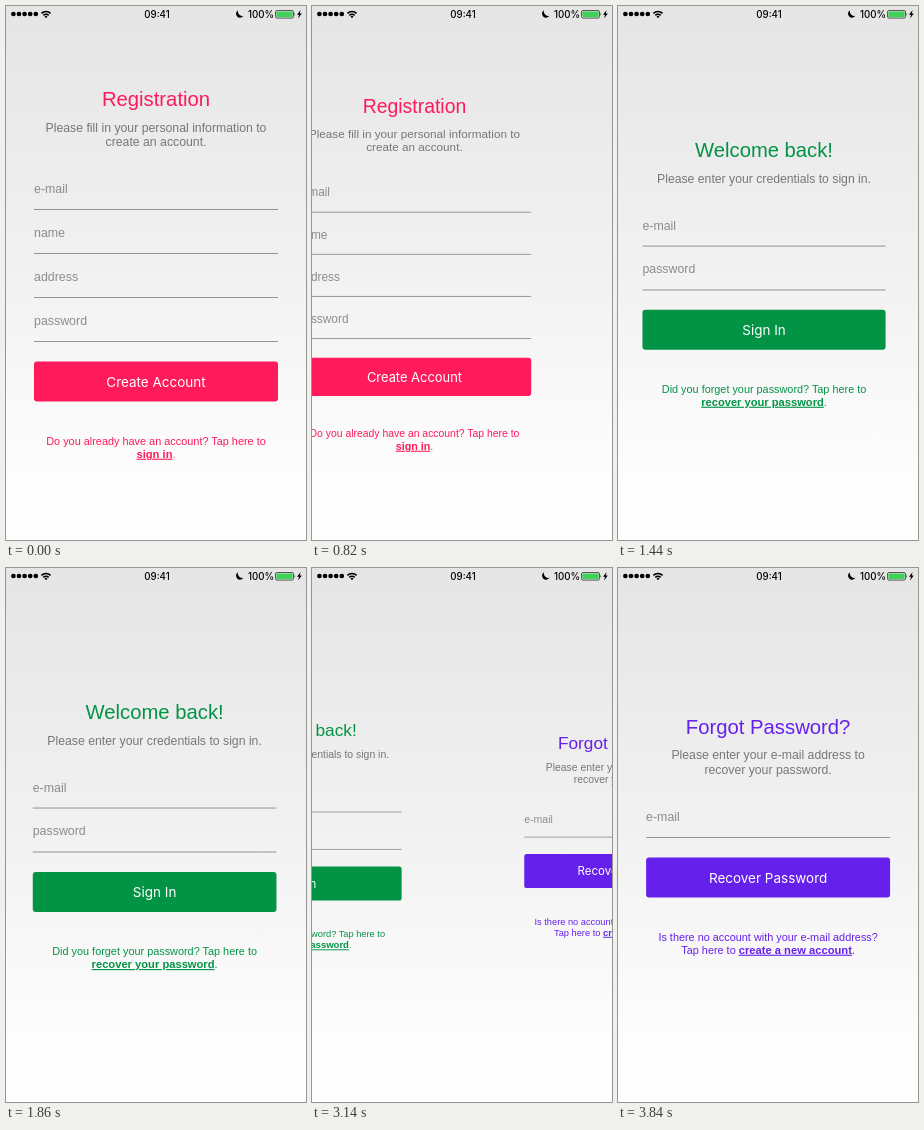
Recreate the animation shown at these times as an HTML page. Size 300x534 px, loop 3.86 s.

```html
<!DOCTYPE html>
<html lang="en">
<head>
<meta charset="utf-8">
<title>Account screens</title>
<style>
  html, body { margin: 0; width: 100%; height: 100%; overflow: hidden; }
  body { background: linear-gradient(#e5e5e5, #f1f1f1 48%, #fefefe 91%); }
  svg { display: block; width: 100vw; height: 100vh; }
  text { font-family: "Liberation Sans", Arial, sans-serif; }
  .mid { text-anchor: middle; }
  .title { font-size: 20.3px; -webkit-text-stroke: .65px #ebebeb; }
  .sub { font-size: 12.27px; fill: #777; }
  .label { font-size: 12.4px; fill: #8c8c8c; }
  .button { font: 13.5px Inter, Roboto, sans-serif; fill: #fff; }
  .foot { font-size: 10.9px; }
  .link { font-size: 11.2px; font-weight: bold; text-decoration: underline; }
  .status { font: 500 9.7px Inter, Roboto, sans-serif; }
</style>
</head>
<body>
<svg viewBox="0 0 300 534">
  <g id="pages"></g>
  <g id="bar">
    <path d="M7.4 8H31" stroke="#000" stroke-width="4.7" stroke-linecap="round" stroke-dasharray="0 5.6"/>
    <g fill="none" stroke="#000" stroke-width="1.5">
      <path d="M35.4 7.4a6.5 6.5 0 0 1 9.2 0M37.3 9.4a3.8 3.8 0 0 1 5.4 0"/>
    </g>
    <path d="M40 12.2l-1.5-1.6a2.1 2.1 0 0 1 3 0z"/>
    <text class="status mid" x="151" y="11.8">09:41</text>
    <path d="M232 4.2a4 4 0 1 0 5.4 5.6a4.5 4.5 0 0 1-5.4-5.6z"/>
    <text class="status mid" x="255" y="11.8">100%</text>
    <rect x="269.5" y="4.5" width="18" height="7.6" rx="1.5" fill="none" stroke="#333" stroke-width=".8"/>
    <rect x="270.4" y="5.4" width="16.2" height="5.8" rx=".8" fill="#3fd158"/>
    <path d="M288.4 6.8q1.6 1.5 0 3z" fill="#333"/>
    <path d="M294.6 4l-3.6 4.8h2l-.9 3.6 3.7-4.9h-2.1z"/>
  </g>
</svg>
<script>
const GAP = 330, CX = 150, CY = 267, LOOP = 3860;

const screens = [
  {
    color: '#ff1a5b', top: 203.5, title: 'Registration',
    sub: ['Please fill in your personal information to', 'create an account.'],
    fields: ['e-mail', 'name', 'address', 'password'], button: 'Create Account',
    foot: 'Do you already have an account? Tap here to', lead: '', link: 'sign in'
  },
  {
    color: '#039345', top: 240, title: 'Welcome back!',
    sub: ['Please enter your credentials to sign in.'],
    fields: ['e-mail', 'password'], button: 'Sign In',
    foot: 'Did you forget your password? Tap here to', lead: '', link: 'recover your password'
  },
  {
    color: '#6620ec', top: 269.5, title: 'Forgot Password?',
    sub: ['Please enter your e-mail address to', 'recover your password.'],
    fields: ['e-mail'], button: 'Recover Password',
    foot: 'Is there no account with your e-mail address?', lead: 'Tap here to ', link: 'create a new account'
  }
];

const centered = (kind, y, body) => `<text class="mid ${kind}" x="${CX}" y="${y}">${body}</text>`;

const field = (name, y) =>
  `<text class="label" x="28" y="${y - 16.5}">${name}</text>
   <path d="M28 ${y}H272" stroke="#949494"/>`;

function screenMarkup(s) {
  const titleY = s.top - 89 - 14.5 * (s.sub.length - 1);
  const buttonY = s.top + 44 * s.fields.length - 24;
  return `<g fill="${s.color}">
    ${centered('title', titleY, s.title)}
    ${s.sub.map((line, i) => centered('sub', titleY + 25.5 + 14.3 * i, line)).join('')}
    ${s.fields.map((name, i) => field(name, s.top + 44 * i)).join('')}
    <rect x="28" y="${buttonY}" width="244" height="40" rx="3"/>
    ${centered('button', buttonY + 25.1, s.button)}
    ${centered('foot', buttonY + 83.1, s.foot)}
    ${centered('foot', buttonY + 96.2, `${s.lead}<tspan class="link">${s.link}</tspan>.`)}
  </g>`;
}

// A slow drag up to the release, then a damped spring to the next page.
function swipe(t, { start, release, pull, power, damping, freq, push }) {
  if (t <= start) return 0;
  if (t < release) return pull * ((t - start) / (release - start)) ** power;
  const s = (t - release) / 1000;
  return 1 - Math.exp(-damping * s) * ((1 - pull) * Math.cos(freq * s) + push * Math.sin(freq * s));
}

const swipes = [
  { start: 280, release: 800, pull: .115, power: .83, damping: 5.25, freq: 4.1, push: .86 },
  { start: 2740, release: 3000, pull: .15, power: 2, damping: 7, freq: 3, push: 1.397 }
];

const pages = document.getElementById('pages');
pages.innerHTML = screens.map(screenMarkup).join('');

function draw(now) {
  const t = now % LOOP;
  const position = swipes.reduce((sum, s) => sum + swipe(t, s), 0);
  [...pages.children].forEach((page, i) => {
    const d = i - position, scale = 1 - .3 * Math.abs(d);
    page.setAttribute('transform',
      `translate(${CX + GAP * d} ${CY}) scale(${scale}) translate(${-CX} ${-CY})`);
  });
  requestAnimationFrame(draw);
}
draw(0);
</script>
</body>
</html>
```
